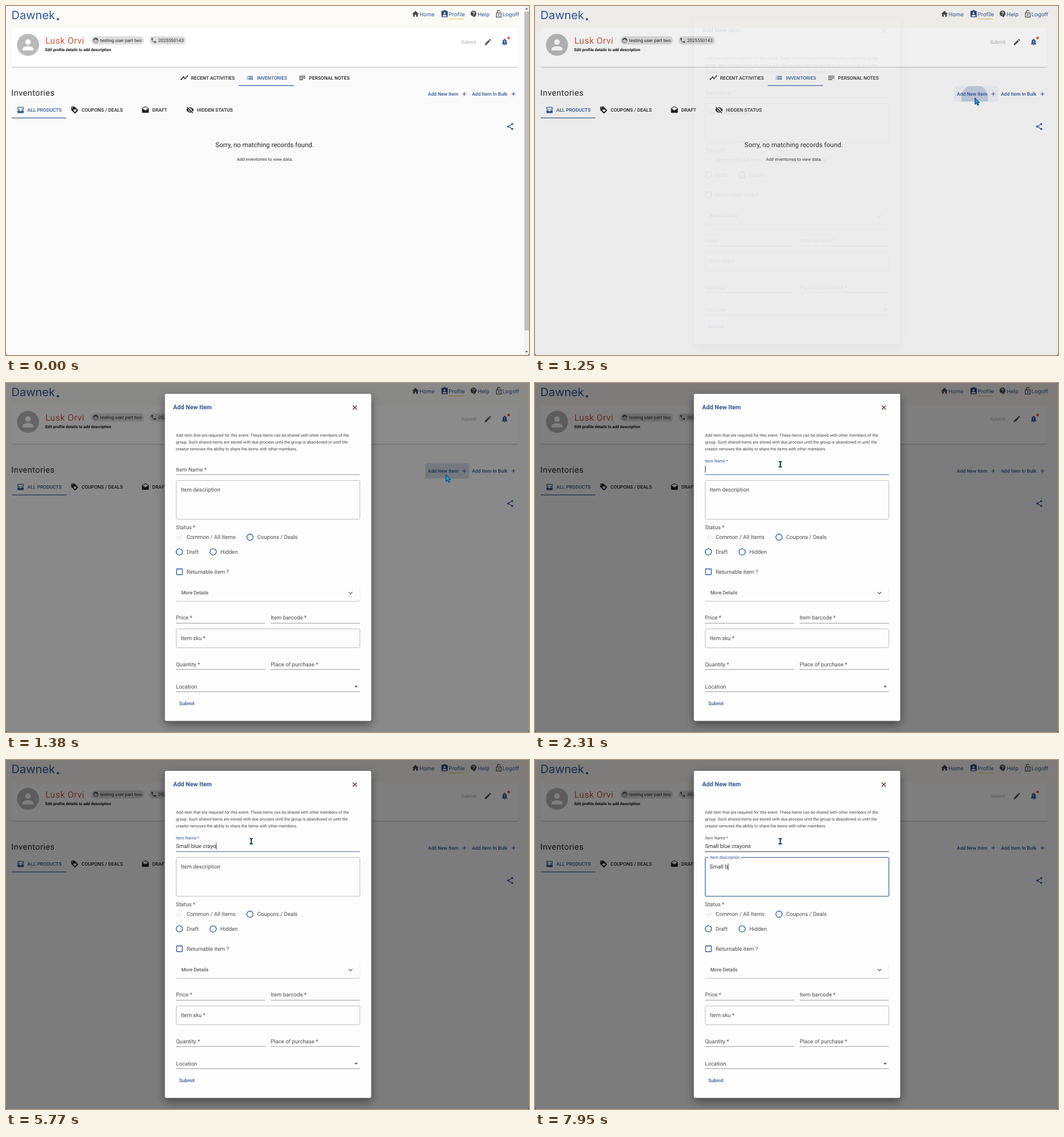
Write an HTML page that moves like this. It is 917 by 611 pixels and loops after 8000 ms.

```html
<!DOCTYPE html>
<html lang="en">
<head>
<meta charset="utf-8">
<title>Add new item</title>
<style>
  html, body { margin: 0; width: 100%; height: 100%; overflow: hidden; background: #fafafa; }
  svg { display: block; width: 917px; height: 611px; }
  text { font-family: Roboto, sans-serif; text-rendering: geometricPrecision; }
  .geo { font-family: Inter, sans-serif; }
</style>
</head>
<body>
<svg id="stage" viewBox="0 0 917 611" xmlns="http://www.w3.org/2000/svg"></svg>
<script>
const BLUE = '#2f5796', DARK = '#222', GREY = '#555', LABEL = '#4c4c4c', LINE = '#9c9c9c';
const BODY = 9.62, SMALL = 7.22, BUTTON = 8.45;
const LOOP = 8000;

const BG = 'fill="#fafafa"';
const stroke = (d, w = 2, c = 'currentColor') => `<path d="${d}" fill="none" stroke="${c}" stroke-width="${w}"/>`;
const shape = (d, attrs = '') => `<path fill-rule="evenodd" d="${d}" ${attrs}/>`;
const dot = (x, y, r, attrs = '') => `<circle cx="${x}" cy="${y}" r="${r}" ${attrs}/>`;

// Icons on a 24 unit grid
const icons = {
  home: shape('M10 20v-6h4v6h5v-8h3L12 3 2 12h3v8z'),
  badge: shape('M5 3h4a3 3 0 016 0h4a2 2 0 012 2v14a2 2 0 01-2 2H5a2 2 0 01-2-2V5a2 2 0 012-2z') +
    dot(12, 4, 1, BG) + dot(12, 10, 3, BG) + shape('M6 19v-1.4c0-4 12-4 12 0V19z', BG),
  help: shape('M11.5 2a8.5 8.5 0 000 17h.5v3c4.9-2.3 8-7 8-11.5A8.5 8.5 0 0011.5 2z') +
    stroke('M9 8.5a2.6 2.6 0 115.2 0c0 2-2.7 2.2-2.7 4.6', 1.9, '#fafafa') + dot(11.5, 15.6, 1.1, BG),
  lock: stroke('M5 9h14v12H5zM8 9V6a4 4 0 018-1') + dot(12, 15, 2),
  person: dot(12, 8, 4) + shape('M4 20v-2c0-5.3 16-5.3 16 0v2z'),
  face: `<circle cx="12" cy="12" r="9" fill="none" stroke="currentColor" stroke-width="2"/>` +
    shape('M3 11c5 0 7-2 8-5 2 3 5 5 10 5l-3-6-6-2-6 2z') + dot(9, 13.5, 1.3) + dot(15, 13.5, 1.3),
  phone: shape('M6.6 10.8c1.4 2.8 3.8 5.1 6.6 6.6l2.2-2.2c.3-.3.7-.4 1-.2 1.1.4 2.3.6 3.6.6.6 0 1 .4 1 1V20c0 .6-.4 1-1 1C10.6 21 3 13.4 3 4c0-.6.4-1 1-1h3.5c.6 0 1 .4 1 1 0 1.3.2 2.5.6 3.6.1.3 0 .7-.2 1z'),
  pencil: shape('M3 17.2V21h3.8L17.8 9.9 14 6.1zM20.7 7a1 1 0 000-1.4l-2.3-2.3a1 1 0 00-1.4 0l-1.8 1.8 3.8 3.8z'),
  bell: shape('M18 16v-5c0-3-1.6-5.6-4.5-6.3V4a1.5 1.5 0 00-3 0v.7C7.6 5.4 6 7.9 6 11v5l-2 2v1h16v-1zM12 22a2 2 0 002-2h-4a2 2 0 002 2zM11 8h2v5h-2zM11 15h2v2h-2z'),
  timeline: stroke('M3 16l6.5-6.5L14 14l7-7') + dot(3, 16, 2) + dot(9.5, 9.5, 2) + dot(14, 14, 2) + dot(21, 7, 2),
  list: stroke('M3 8h2M7 8h14M3 12h2M7 12h14M3 16h2M7 16h14'),
  notes: stroke('M3 7h18M3 12h18M3 17h12'),
  inbox: shape('M5 3h14a2 2 0 012 2v6H3V5a2 2 0 012-2zM5 5v4h4a3 3 0 006 0h4V5z') +
    shape('M3 13h6a3 3 0 006 0h6v6a2 2 0 01-2 2H5a2 2 0 01-2-2z'),
  tag: shape('M21.4 11.6l-9-9A2 2 0 0011 2H4a2 2 0 00-2 2v7c0 .6.2 1 .6 1.4l9 9a2 2 0 002.8 0l7-7a2 2 0 000-2.8z') +
    dot(5.5, 5.5, 1.5, BG) + shape('M13 18l-4-4a2.4 2.4 0 014-2.8 2.4 2.4 0 014 2.8z', BG),
  draft: shape('M22 8c0-.7-.4-1.3-.9-1.7L12 1 2.9 6.3C2.4 6.7 2 7.3 2 8v10a2 2 0 002 2h16a2 2 0 002-2zM12 13L3.7 7.8 12 3l8.3 4.8z'),
  hidden: shape('M12 4.5C7 4.5 2.7 7.6 1 12c1.7 4.4 6 7.5 11 7.5s9.3-3.1 11-7.5c-1.7-4.4-6-7.5-11-7.5z') +
    dot(12, 12, 5, BG) + dot(12, 12, 3) + stroke('M4 2l18 18', 2, '#fafafa') + stroke('M2.5 3l18 18'),
  plus: stroke('M5 12h14M12 5v14'),
  share: stroke('M18 5L6 12l12 7') + dot(18, 5, 3) + dot(6, 12, 3) + dot(18, 19, 3)
};

const icon = (name, cx, cy, color = DARK, size = 14.45) =>
  `<g transform="translate(${cx - size / 2} ${cy - size / 2}) scale(${size / 24})" color="${color}" fill="currentColor">${icons[name]}</g>`;
const text = (x, y, size, str, color = DARK, attrs = '') =>
  `<text x="${x}" y="${y}" font-size="${size}" fill="${color}" ${attrs}>${str}</text>`;
const rect = (x, y, w, h, fill, attrs = '') =>
  `<rect x="${x}" y="${y}" width="${w}" height="${h}" fill="${fill}" ${attrs}/>`;
const medium = (x, y, str, color) => text(x, y, BUTTON, str, color, 'font-weight="500"');
const label = (x, y, str) => text(x, y, BODY, str, LABEL);
const underline = (x, y, w) => rect(x, y, w, 1, LINE);
const outline = (y, h) => rect(298.5, y, 322, h, 'none', 'rx="2.4" stroke="#bfbfbf" stroke-width="1"');
const radio = (x, y) => dot(x, y, 5.5, `fill="none" stroke="${BLUE}" stroke-width="1.3"`);

const nav = (name, ix, x, str, color = '#4a4a4a') =>
  icon(name, ix, 14, color) + text(x, 18.4, 9.5, str, BLUE, 'class="geo"');
const tab = (name, ix, x, y, str, color = DARK) => icon(name, ix, y - 3, color) + medium(x, y, str, color);
const chip = (name, x, w, str) =>
  rect(x, 53, w, 14.5, '#dedede', 'rx="7.25"') + icon(name, x + 7.7, 60.2, '#444', 11) + text(x + 15.5, 62.9, 7.95, str);

const page = [
  rect(0, 0, 917, 611, '#fafafa'),
  rect(0, 0, 917, 38, '#fbfaf6'),
  text(9.5, 23, 20, 'Dawnek', BLUE, 'class="geo"'),
  rect(89.3, 21.3, 3.6, 3.6, BLUE),
  nav('home', 718, 725, 'Home'),
  nav('badge', 769, 776, 'Profile', '#263f7c'),
  rect(776, 22.2, 27, 1.1, '#ecc04a'),
  nav('help', 820, 827, 'Help'),
  nav('lock', 864, 870.5, 'Logoff'),
  rect(10, 39, 888, 67.5, '#fff', 'rx="2.4" filter="url(#cardShadow)"'),
  dot(38.6, 68, 19.3, 'fill="#b9b9b9"'),
  icon('person', 38.6, 68, '#fff', 29),
  text(69, 66, 15.65, 'Lusk Orvi', '#c9593c', 'letter-spacing=".5"'),
  text(69, 79.2, 7, 'Edit profile details to add description', '#111', 'font-weight="700"'),
  chip('face', 149.6, 92.4, 'testing user part two'),
  chip('phone', 251.3, 64.5, '2025550143'),
  medium(798, 65.8, 'Submit', '#bcbcbc'),
  icon('pencil', 845, 63, GREY),
  icon('bell', 874.3, 63, BLUE),
  dot(881.3, 56, 2.3, 'fill="#e8532e"'),
  tab('timeline', 312.7, 324.5, 128.8, 'RECENT ACTIVITIES'),
  tab('list', 427.7, 440, 128.8, 'INVENTORIES', BLUE),
  tab('notes', 519.5, 531.3, 128.8, 'PERSONAL NOTES'),
  rect(408, 138.7, 97, 1.2, BLUE),
  text(9.3, 156.6, 14.45, 'Inventories', DARK, 'letter-spacing=".48"'),
  rect(735, 140.3, 77, 27, BLUE, 'id="hover" rx="2.4"'),
  `<g clip-path="url(#buttonClip)">${dot(771, 161, 0, `id="ripple" fill="${BLUE}"`)}</g>`,
  medium(739.8, 157, 'Add New Item', BLUE),
  icon('plus', 803.5, 154, BLUE, 12),
  medium(817, 157, 'Add Item In Bulk', BLUE),
  icon('plus', 889.7, 154, BLUE, 12),
  tab('inbox', 25.5, 37.6, 185.1, 'ALL PRODUCTS', BLUE),
  tab('tag', 120.3, 132.5, 185.1, 'COUPONS / DEALS'),
  tab('draft', 244.4, 256.5, 185.1, 'DRAFT'),
  tab('hidden', 322.7, 334.8, 185.1, 'HIDDEN STATUS'),
  rect(10, 195.4, 96, 1.2, BLUE),
  icon('share', 884, 211, BLUE),
  text(453.6, 247.2, 11.52, 'Sorry, no matching records found.', DARK, 'text-anchor="middle"'),
  text(453.8, 270.8, 7.68, 'Add inventories to view data.', '#333', 'text-anchor="middle"'),
  `<g id="scrollbar">${rect(908.4, 0, 8.6, 611, '#f1f1f1')}${rect(909, 10, 8, 558, '#c1c1c1')}`,
  shape('M910.5 6l2.3-3 2.3 3zM910.5 604l2.3 3 2.3-3z', 'fill="#666"') + '</g>'
].join('');

const dialog = [
  rect(278.7, 19, 361.5, 572.4, '#fdfdfd', 'rx="2.4" filter="url(#dialogShadow)"'),
  text(293, 46.4, 10.75, 'Add New Item', BLUE, 'font-weight="700"'),
  stroke('M608 39.5l7 7M615 39.5l-7 7', 1.3, '#5e2c1e'),
  text(298, 94.4, SMALL, 'Add item that are required for this event. These items can be shared with other members of the', '#444'),
  text(298, 106.2, SMALL, 'group. Such shared items are stored with due process until the group is abandoned or until the', '#444'),
  text(298, 118, SMALL, 'creator removes the ability to share the items with other members.', '#444'),
  `<text id="nameLabel" font-size="${BODY}">Item Name *</text>`,
  text(298, 154, BODY, '', '#333', 'id="nameText"'),
  rect(298, 160, 322.5, 1, LINE, 'id="nameLine"'),
  rect(298, 160, 322.5, 1, '#4a6fa8', 'id="nameFocus"'),
  `<g id="descIdle">${outline(170.5, 68)}</g>`,
  `<g id="descFocus">${stroke('M361 170.5H618a2.4 2.4 0 012.5 2.4V236a2.4 2.4 0 01-2.5 2.5H301a2.4 2.4 0 01-2.5-2.5V172.9a2.4 2.4 0 012.5-2.4H304', 1.1, BLUE)}</g>`,
  `<text id="descLabel" font-size="${BODY}">Item description</text>`,
  text(306.3, 190, BODY, '', '#333', 'id="descText"'),
  rect(0, 0, .9, 11.4, '#222', 'id="caret"'),
  label(298, 256.4, 'Status *'),
  dot(304, 270, 5.5, 'fill="none" stroke="#ededed" stroke-width="1"') + dot(304, 270, 2.6, 'fill="#ededed"'),
  label(316.7, 273.4, 'Common / All Items'),
  radio(427.8, 270) + label(440.5, 273.4, 'Coupons / Deals'),
  radio(304, 295.7) + label(316.7, 299.1, 'Draft'),
  radio(363.2, 295.7) + label(375.8, 299.1, 'Hidden'),
  rect(299.1, 325.5, 10, 10, 'none', `rx=".8" stroke="${BLUE}" stroke-width="1.3"`),
  label(316.7, 334, 'Returnable item ?'),
  rect(298, 353, 322.5, 28.5, '#fdfdfd', 'rx="2.4" filter="url(#cardShadow)"'),
  text(307.5, 370.2, BUTTON, 'More Details', '#333'),
  stroke('M600.8 365.8l3.3 3.3 3.3-3.3', 1.2, GREY),
  label(298, 414, 'Price *') + underline(298, 420, 156.4),
  label(464, 414, 'Item barcode *') + underline(464, 420, 156.5),
  outline(430.5, 33) + label(306.3, 449.8, 'Item sku *'),
  label(298, 496, 'Quantity *') + underline(298, 501, 156.4),
  label(464, 496, 'Place of purchase *') + underline(464, 501, 156.5),
  label(298, 534.5, 'Location') + underline(298, 540, 322.5),
  shape('M611 530.2h6l-3 3z', `fill="${GREY}"`),
  medium(303.8, 564.2, 'Submit', BLUE)
].join('');

const stage = document.getElementById('stage');
stage.innerHTML = `
  <defs>
    <filter id="cardShadow" x="-5%" y="-20%" width="110%" height="150%">
      <feDropShadow dx="0" dy=".9" stdDeviation=".7" flood-opacity=".38"/></filter>
    <filter id="dialogShadow" x="-10%" y="-10%" width="120%" height="120%">
      <feDropShadow dx="0" dy="6" stdDeviation="8" flood-opacity=".46"/></filter>
    <clipPath id="buttonClip">${rect(735, 140.3, 77, 27, '#000', 'rx="2.4"')}</clipPath>
  </defs>
  ${page}
  ${rect(0, 0, 917, 611, '#000', 'id="backdrop"')}
  <g id="dialog">${dialog}</g>
  <g id="cursor">
    <path id="arrow" d="M0 0v11.3l2.6-2.4 2 4.2 2-.9-2-4.1h3.6z" fill="#1ba1e6" stroke="#0d2c48" stroke-width="1"/>
    <g id="beam">${stroke('M-3-4.4h6M0-4.4v9.2M-3 4.8h6', 1.9, '#163c52')}</g>
  </g>
  ${shape('M0 608q0 3 3 3H0zM917 608q0 3-3 3h3z', 'fill="#222"')}`;

const el = {};
stage.querySelectorAll('[id]').forEach(node => el[node.id] = node);

const NAME = 'Small blue crayons', DESC = 'Small b';
const NAME_KEYS = [3120, 3320, 3420, 3510, 3720, 3780, 3980, 4050, 4180, 4380, 4970, 5030, 5300, 5440, 5640, 5770, 5900, 5970];
const DESC_KEYS = [7230, 7290, 7420, 7560, 7660, 7750, 7950];
const CARET_OFF = [[2650, 3120], [4910, 4970], [6830, 7230]];
const NAME_FOCUS = 2050, DESC_FOCUS = 6300;
// time, x, y
const PATH = [[250, 38, 556], [780, 886, 152], [1050, 771.5, 161], [1400, 771.5, 161], [1980, 430, 142]];
const FADE = [[1180, 0], [1250, .08], [1316, .87], [1380, 1]];

const clamp = v => Math.min(1, Math.max(0, v));
const progress = (t, start, length) => clamp((t - start) / length);
const easeOut = (p, k = 3.4) => 1 - (1 - p) ** k;
const smooth = p => p * p * (3 - 2 * p);
const show = (node, on) => node.setAttribute('visibility', on ? 'inherit' : 'hidden');

function along(rows, t, ease = p => p) {
  if (t <= rows[0][0]) return rows[0].slice(1);
  for (let i = 1; i < rows.length; i++) {
    const [a, b] = [rows[i - 1], rows[i]];
    if (t < b[0]) {
      const p = ease((t - a[0]) / (b[0] - a[0]));
      return a.slice(1).map((v, j) => v + (b[j + 1] - v) * p);
    }
  }
  return rows[rows.length - 1].slice(1);
}

function type(node, str, keys, t) {
  const typed = str.slice(0, keys.filter(k => k <= t).length).replace(/ /g, '\u00a0');
  if (node.textContent !== typed) node.textContent = typed;
  return typed ? node.getComputedTextLength() : 0;
}

function float(node, p, x0, y0, x1, y1, color) {
  const mix = (a, b) => a + (b - a) * p;
  node.setAttribute('transform', `translate(${mix(x0, x1)} ${mix(y0, y1)}) scale(${mix(1, .75)})`);
  node.setAttribute('fill', color);
}

const tick = t => t < 2400 ? 50 + Math.floor((t - 42) * .015) / .015 : t;

function draw(time) {
  const t = tick(time);
  const inName = time >= NAME_FOCUS && time < DESC_FOCUS, inDesc = time >= DESC_FOCUS;

  show(el.scrollbar, time < 1180);
  el.hover.setAttribute('opacity', t >= 1040 && t < 1850 ? .06 : 0);
  el.ripple.setAttribute('r', 46 * easeOut(progress(t, 1180, 225), 1.9));
  el.ripple.setAttribute('opacity', .22 * (1 - progress(t, 1290, 220)));
  el.backdrop.setAttribute('opacity', .5 * easeOut(progress(t, 1240, 280)));
  el.dialog.setAttribute('opacity', along(FADE, t)[0]);
  show(el.dialog, t > 1200);

  const [x, y] = along(PATH, t, smooth);
  const overInput = t > 1400 && x < 620;
  el.cursor.setAttribute('transform', `translate(${x} ${y})`);
  show(el.cursor, time >= 250);
  show(el.arrow, !overInput);
  show(el.beam, overInput);

  float(el.nameLabel, easeOut(progress(t, 2020, 300)), 298, 154.6, 298, 138.8, inName ? BLUE : LABEL);
  float(el.descLabel, easeOut(progress(t, 6250, 260)), 306.3, 190.4, 307, 172.8, inDesc ? BLUE : LABEL);
  el.nameLine.setAttribute('fill', overInput && !inName ? '#444' : LINE);
  const grow = .5 + .5 * easeOut(progress(t, 2000, 280));
  el.nameFocus.setAttribute('x', 298 + 161.25 * (1 - grow));
  el.nameFocus.setAttribute('width', 322.5 * grow);
  show(el.nameFocus, inName);
  show(el.descIdle, !inDesc);
  show(el.descFocus, inDesc);

  const nameWidth = type(el.nameText, NAME, NAME_KEYS, time);
  const descWidth = type(el.descText, DESC, DESC_KEYS, time);
  el.caret.setAttribute('x', inDesc ? 306.3 + descWidth : 298 + nameWidth);
  el.caret.setAttribute('y', inDesc ? 181.3 : 145.3);
  show(el.caret, (inName || inDesc) && !CARET_OFF.some(([a, b]) => time >= a && time < b));
}

const start = performance.now();
function loop() {
  draw((performance.now() - start) % LOOP);
  requestAnimationFrame(loop);
}
loop();
</script>
</body>
</html>
```
